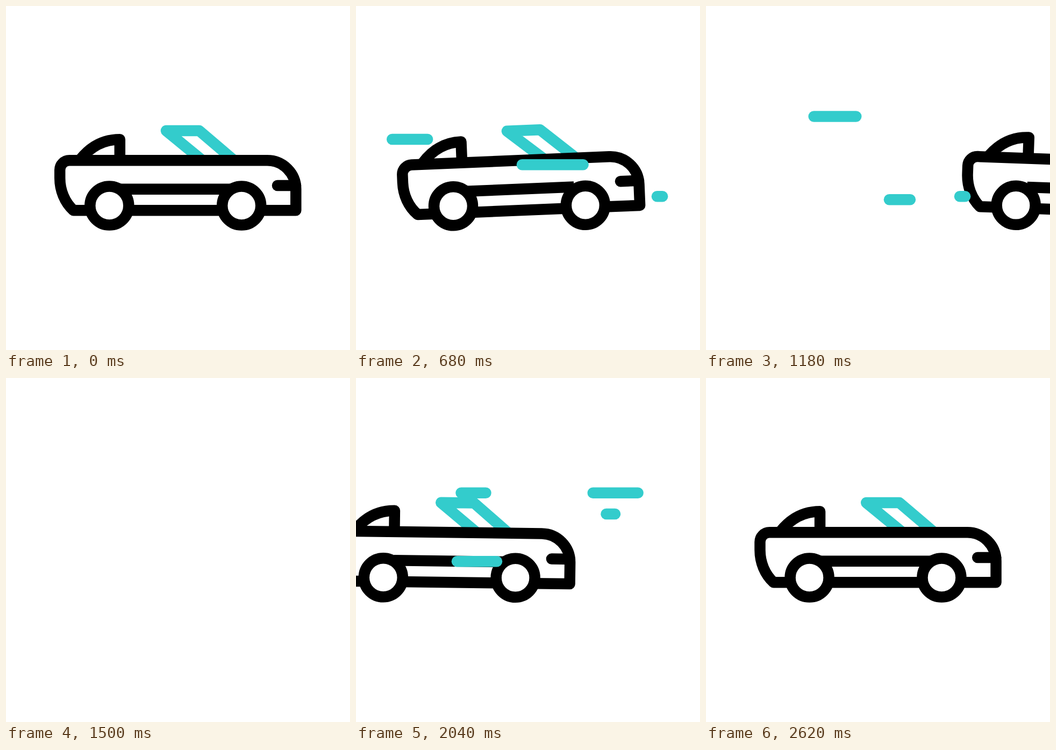
Recreate the animation shown at these times as an HTML page. Size 640 by 640 pixels, loop 2800 ms.

```html
<!DOCTYPE html>
<html lang="en">
<head>
<meta charset="utf-8">
<title>Convertible</title>
<style>
  html, body { margin: 0; width: 100%; height: 100%; overflow: hidden; background: #fff; }
  svg { display: block; width: 100vw; height: 100vh; }
  path, circle, line { fill: none; stroke: #000; stroke-width: 20.5; stroke-linejoin: round; }
  circle { fill: #fff; }
  .teal, #dashes line { stroke: #3cc; }
  .round, #dashes line { stroke-linecap: round; }
</style>
</head>
<body>
<svg viewBox="0 0 640 640">
  <g id="car">
    <g id="body">
      <path class="teal" d="M365 287 L298 232 H359.5 L424 287"/>
      <path d="M139.5 284 C159 260 184 248.2 211.8 248.2 V287"/>
      <path d="M155 380.2 H125.5 C109 365 100.2 343 100.2 320 V305 A17.7 17.7 0 0 1 117.9 287.3 H486 A53.3 53.3 0 0 1 539.3 340.6 V380.2 H475"/>
      <path d="M212 340.7 H418 M225 380.2 H405"/>
      <path class="round" d="M505 334 H539"/>
    </g>
    <g id="wheels">
      <circle cx="192.3" cy="371.5" r="36"/>
      <circle cx="438.2" cy="371.5" r="36"/>
    </g>
  </g>
  <g id="dashes"></g>
</svg>
<script>
const LOOP = 2800, STEP = 20;
const PIVOT = '315 371.5';
const DRAW = 500, LAG = 200; // a dash's tail follows its head after LAG

const byId = id => document.getElementById(id);

function ease(t, from, to) {
  const u = Math.min(1, Math.max(0, (t - from) / (to - from)));
  return u * u * (3 - 2 * u);
}

// Back up, speed off to the right, return from the left, overshoot, settle.
function drive(t) {
  const leaving = -23 * ease(t, 200, 604) + 575 * ease(t, 604, 1500);
  const arriving = -555 + 581 * ease(t, 1580, 2293) - 26 * ease(t, 2293, 2640);
  return t < 1500 ? leaving : arriving;
}

function tilt(t) {
  const leaving = -3 * ease(t, 200, 600) + 6 * ease(t, 600, 1000) - 3 * ease(t, 1000, 1500);
  const arriving = 3 * ease(t, 1580, 1740) - 4 * ease(t, 1740, 2293) + ease(t, 2293, 2640);
  return leaving + arriving;
}

function dash(start, y, right, left) {
  const line = document.createElementNS('http://www.w3.org/2000/svg', 'line');
  line.setAttribute('y1', y);
  line.setAttribute('y2', y);
  byId('dashes').append(line);
  const xAt = (t, from) => right + (left - right) * ease(t, from, from + DRAW);
  return t => {
    line.setAttribute('x1', xAt(t, start));
    line.setAttribute('x2', xAt(t, start + LAG));
    line.style.display = t > start && t < start + LAG + DRAW ? '' : 'none';
  };
}

const dashes = [
  dash(200, 248, 229, 66.4),
  dash(340, 295.2, 461, 260.5),
  dash(580, 354.3, 570.2, 472),
  dash(700, 360.3, 436.5, 340.5),
  dash(800, 205.5, 320.8, 180.2),
  dash(1660, 213.8, 569, 419),
  dash(1800, 341.2, 265, 101),
  dash(1870, 213.8, 241.5, 70),
  dash(1900, 253, 482, 396)
];

function draw(t) {
  const angle = tilt(t);
  byId('car').setAttribute('transform', `translate(${drive(t)} 0)`);
  byId('body').setAttribute('transform', `rotate(${angle} ${PIVOT})`);
  byId('wheels').setAttribute('transform', `rotate(${angle * 0.15} ${PIVOT})`);
  dashes.forEach(update => update(t));
}

const start = performance.now();
function tick() {
  const t = (performance.now() - start) % LOOP;
  draw(Math.floor(t / STEP) * STEP);
  requestAnimationFrame(tick);
}
tick();
</script>
</body>
</html>
```
